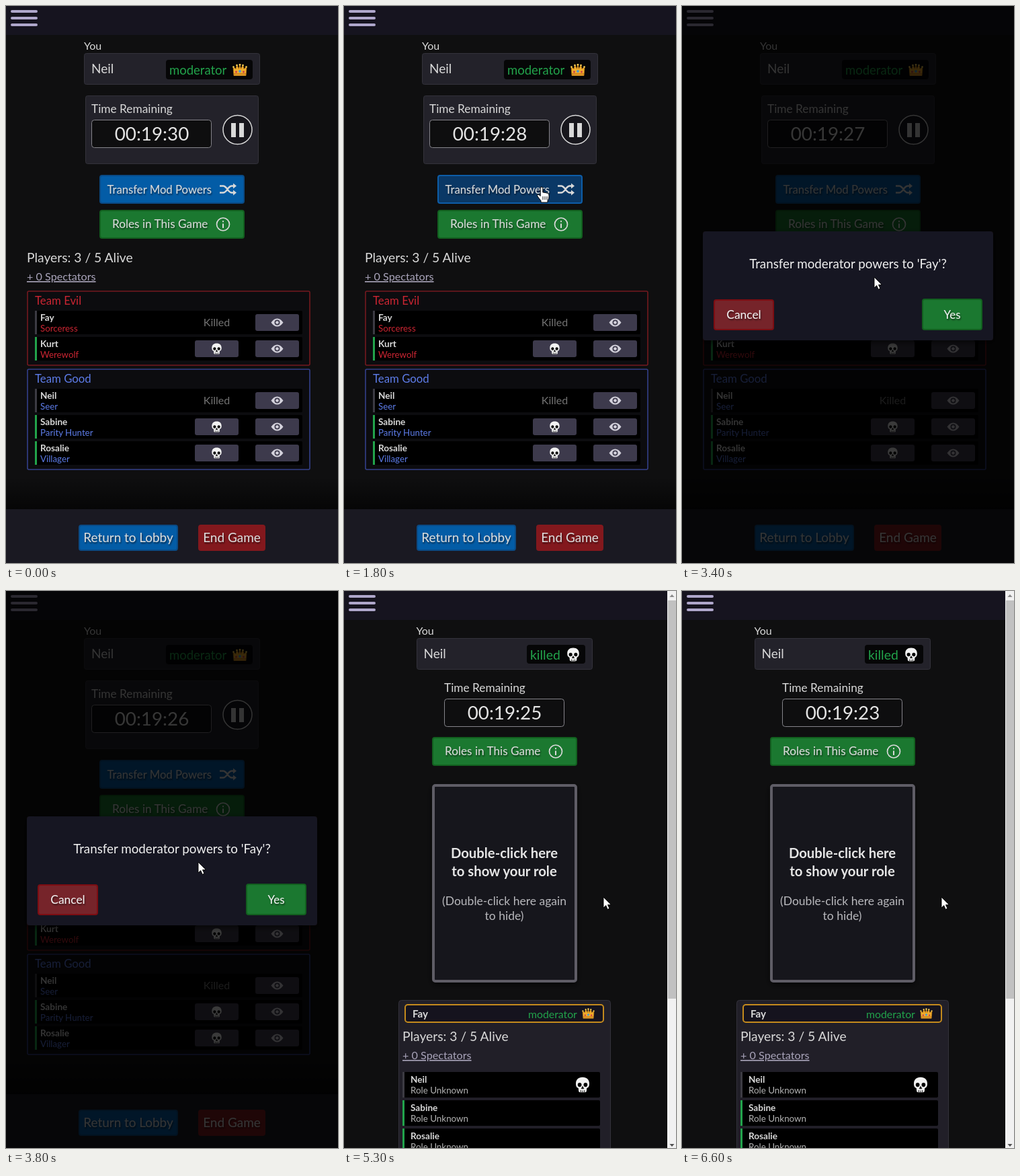
Recreate the animation shown at these times as an HTML page. Size 494x828 px, loop 7100 ms.

```html
<!DOCTYPE html>
<html lang="en">
<head>
<meta charset="utf-8">
<title>Transfer moderator powers</title>
<style>
html, body { margin: 0; width: 100%; height: 100%; overflow: hidden; background: #0f0f10; }
svg { display: block; width: 100vw; height: 100vh; }
text { font-family: Lato, "Open Sans", sans-serif; white-space: pre; }
</style>
</head>
<body>
<svg id="stage" viewBox="0 0 494 828">
  <defs>
    <linearGradient id="fade" x2="0" y2="1">
      <stop offset="0" stop-color="#000" stop-opacity="0"/>
      <stop offset="1" stop-color="#000" stop-opacity=".6"/>
    </linearGradient>
    <filter id="soft" x="-20%" y="-20%" width="140%" height="140%">
      <feDropShadow dx="0" dy="3" stdDeviation="4" flood-color="#000" flood-opacity=".6"/>
    </filter>
    <filter id="drop"><feDropShadow dx="1" dy="2" stdDeviation="1" flood-color="#000" flood-opacity=".6"/></filter>
  </defs>
</svg>
<script>
const LOOP = 7100;
const INK = '#d9d9d9', BRIGHT = '#f0f0f0', GREEN = '#22a34b', RED = '#cb2532', BLUE = '#5d7ce8';
const BTN = {
  blue: ['#035ca6', '#0a4a85'],
  blueHover: ['#0a3866', '#0d5da8'],
  green: ['#1b7830', '#12601f'],
  greenHover: ['#2d623e', '#188038'],
  red: ['#83181d', '#83181d'],
  cancel: ['#7a1a1e', '#7d0d12'],
  cancelSoft: ['#76242a', '#7d0d12'],
};

const rect = (x, y, w, h, fill, r = 0, stroke = 'none', sw = 1, extra = '') =>
  `<rect x="${x}" y="${y}" width="${w}" height="${h}" rx="${r}" fill="${fill}" stroke="${stroke}" stroke-width="${sw}" ${extra}/>`;
const text = (x, y, size, str, fill = INK, extra = '') =>
  `<text x="${x}" y="${y}" font-size="${size}" fill="${fill}" ${extra}>${str}</text>`;
const bold = (x, y, size, str, fill = INK, extra = '') =>
  text(x, y, size, str, fill, 'font-weight="700" ' + extra);
const group = (id, body) => `<g id="${id}">${body}</g>`;
const at = (x, y, s, body) => `<g transform="translate(${x} ${y}) scale(${s})">${body}</g>`;
const MID = 'text-anchor="middle" ';
const SHADE = 'filter="url(#drop)"';

// Icons are centred on the point they are given.
const skull = (x, y, s = 1) => at(x, y, s, `
  <path d="M-8-1.5C-8-6-5-9 0-9S8-6 8-1.5C8 1 7.5 3 5 4L4.6 8Q4 9 2.5 9H-2.5Q-4 9-4.6 8L-5 4C-7.5 3-8 1-8-1.5Z" fill="#f2f2f2"/>
  <path d="M0 2L-1.4 4.6H1.4ZM-2.2 6.4V9M0 6.8V9M2.2 6.4V9" fill="#111" stroke="#111" stroke-width=".8"/>
  <ellipse cx="-3.5" rx="2.3" ry="2.5"/><ellipse cx="3.5" rx="2.3" ry="2.5"/>`);
const crown = (x, y, s = 1) => at(x, y, s, `
  <path d="M-9 8L-10-5-6-2-4.500-8-1.500-2 0-9 1.500-2 4.500-8 6-2 10-5 9 8Z" fill="#f0ad2c" stroke="#c57f18" stroke-width=".7"/>
  <path d="M-9 5.500H9" stroke="#b8661a" stroke-width="1.2"/>
  <g fill="#ffd457"><circle cx="-9.5" cy="-5" r="1.3"/><circle cx="-4.5" cy="-7.5" r="1.3"/><circle cy="-8.2" r="1.4"/><circle cx="4.5" cy="-7.5" r="1.3"/><circle cx="9.5" cy="-5" r="1.3"/></g>
  <circle cy="1.5" r="1.9" fill="#4a9ad0"/><circle cx="-5.5" cy="2.5" r="1.4" fill="#c9364c"/><circle cx="5.5" cy="2.5" r="1.4" fill="#c9364c"/>`);
const eye = (x, y) => at(x, y, 1, `
  <path d="M-9 0Q-5-6 0-6T9 0Q5 6 0 6T-9 0Z" fill="#d4d2dc"/>
  <circle r="4" fill="#3d3a4c"/><circle r="2.3" fill="#d4d2dc"/>`);
const info = (x, y) => at(x, y, 1, `
  <circle r="9.5" fill="none" stroke="${INK}" stroke-width="1.7"/>
  <path d="M0-1V5.500M0-5.200V-3.200" stroke="${INK}" stroke-width="2"/>`);
const shuffle = (x, y) => at(x, y, 1, `
  <path d="M-12-5H-7C-1-5 0 5 6 5H9M-12 5H-7C-1 5 0-5 6-5H9" fill="none" stroke="${INK}" stroke-width="2.3"/>
  <path d="M8-9L13-5 8-1ZM8 1L13 5 8 9Z" fill="${INK}"/>`);

const button = (x, y, w, h, [fill, stroke], id = '') =>
  rect(x + 1, y + 1, w - 2, h - 2, fill, 3, stroke, 2, id && `id="${id}"`);
const box = (x, y, w, h) => rect(x + .5, y + .5, w - 1, h - 1, '#23222a', 3, '#33323b');
const clock = (x, y) => rect(x + .5, y + .5, 178, 41, '#0e0e0f', 4, '#85848a') +
  text(x + 90, y + 31, 27.8, '', '#e4e4e4', 'class="clock" ' + MID);
const menu = w => rect(0, 0, w, 43, '#16141f') +
  [8, 18, 28].map(y => rect(7, y - 2, 40, 4, '#afa7cb', 2)).join('');
const rolesButton = (x, y) => button(x, y, 216, 43, BTN.green) +
  text(x + 19, y + 27, 17.2, 'Roles in This Game', INK, SHADE) + info(x + 184, y + 21.5);
const players = (x, y) => text(x, y, 19.3, 'Players: 3 / 5 Alive') +
  text(x, y + 27, 16.2, '+ 0 Spectators', '#aaa5bb', 'text-decoration="underline"');

function playerRow(y, name, role, color, alive) {
  return rect(43, y, 398, 35, '#000', 2) +
    rect(43, y, 3, 35, alive ? GREEN : '#3c3b43') +
    bold(51, y + 14.5, 13.6, name) + text(51, y + 31, 13.3, role, color) +
    (alive ? rect(281, y + 5, 65, 25, '#3d3a4c', 3) + skull(313.5, y + 17.5, .9)
           : text(313.5, y + 23, 16, 'Killed', '#737373', MID)) +
    rect(371, y + 5, 65, 25, '#3d3a4c', 3) + eye(403.5, y + 17.5);
}
const team = (y, h, title, color, border, rows) =>
  rect(32, y, 420, h, '#0c0c0f', 2, border, 1.6) + text(43, y + 20, 16.8, title, color) +
  rows.map(([name, role, alive], i) => playerRow(y + 29 + 39 * i, name, role, color, alive)).join('');

const modView = rect(0, 0, 494, 828, '#0f0f10') + menu(494) +
  text(116, 65, 16, 'You') + box(116, 70, 262, 47) + text(127, 100, 19, 'Neil') +
  rect(238, 80, 129, 29, '#060607', 4) + text(243, 102, 18.5, 'moderator', GREEN) + crown(348, 95.5) +
  box(118, 133, 258, 102) + text(127, 159, 17.3, 'Time Remaining') + clock(127, 169) +
  `<circle cx="344.5" cy="184" r="21.5" fill="#17161c" stroke="${INK}" stroke-width="1.5"/>` +
  rect(335, 174, 7, 21, INK) + rect(347, 174, 7, 21, INK) +
  button(139, 251, 216, 43, BTN.blue, 'transfer') +
  text(150.5, 279, 16.7, 'Transfer Mod Powers', INK, SHADE) + shuffle(330, 272.5) +
  rolesButton(139, 303) + players(31, 381) +
  team(424, 110, 'Team Evil', RED, '#74191f', [['Fay', 'Sorceress', 0], ['Kurt', 'Werewolf', 1]]) +
  team(540, 149, 'Team Good', BLUE, '#34408a',
    [['Neil', 'Seer', 0], ['Sabine', 'Parity Hunter', 1], ['Rosalie', 'Villager', 1]]) +
  rect(0, 700, 494, 48, 'url(#fade)') + rect(0, 748, 494, 80, '#1a1922') +
  button(108, 771, 148, 39, BTN.blue) + text(182, 797, 18.9, 'Return to Lobby', INK, MID + SHADE) +
  button(286, 771, 100, 39, BTN.red) + text(336, 797, 19, 'End Game', INK, MID + SHADE);

const unknownRow = (y, name, alive) => rect(87, y, 294, 38, '#000', 2) +
  rect(87, y, 3, 38, alive ? GREEN : '#3c3b43') +
  bold(99, y + 15.5, 13.6, name) + text(99, y + 32, 13.4, 'Role Unknown', '#b4b4b4') +
  (alive ? '' : skull(355, y + 19, 1.25));

const playerView = rect(0, 0, 494, 828, '#0f0f10') + menu(481) +
  text(107.5, 65, 16, 'You') + box(108, 70, 262, 47) + text(118.5, 100, 19, 'Neil') +
  rect(272, 80, 87, 28, '#060607', 4) + text(277, 102, 19.4, 'killed', GREEN) + skull(341, 94.5, 1.1) +
  text(149, 150, 17.3, 'Time Remaining') + clock(149, 160) + rolesButton(131, 217) +
  rect(133, 289, 212, 291, '#15131e', 3, '#5f5d66', 4, 'filter="url(#soft)"') +
  bold(238.5, 397, 20.3, 'Double-click here', '#e6e6e6', MID) +
  bold(238.5, 424, 20.3, 'to show your role', '#e6e6e6', MID) +
  text(238.5, 467, 17.5, '(Double-click here again', '#b9b9bd', MID) +
  text(238.5, 489, 17.5, 'to hide)', '#b9b9bd', MID) +
  rect(81.5, 608.5, 315, 230, '#211f28', 4, '#33323b') +
  rect(91, 615, 295, 26, '#15131e', 4, '#c48a1c', 2) + bold(102, 634, 15.2, 'Fay') +
  text(274, 634.5, 15.8, 'moderator', GREEN) + crown(363.5, 628.5, .85) + players(87, 669) +
  unknownRow(715, 'Neil', 0) + unknownRow(757, 'Sabine', 1) + unknownRow(799, 'Rosalie', 1) +
  rect(481, 0, 13, 828, '#f1f1f1') + rect(482, 14, 12, 592, '#c1c1c1') +
  '<path d="M484.5 9L488 5 491.5 9Z" fill="#8a8a8a"/><path d="M484.5 822L488 826 491.5 822Z" fill="#505050"/>';

const panel = (y, h) => rect(31, y, 432, h, '#171520', 4, 'none', 1, 'filter="url(#soft)"');
const pickModal = panel(315, 202) +
  bold(143, 350, 16.8, 'Select a new moderator', BRIGHT) + crown(338, 344, .88) +
  rect(61, 379, 372, 34, '#24232c', 2, '#484650', 2, 'id="choice"') + bold(67, 403, 16.5, 'Fay', BRIGHT) +
  text(362, 403, 16.8, 'killed', GREEN) + skull(416, 397, .98) +
  button(193, 456, 108, 45, BTN.cancel) + text(247, 485, 17.4, 'Cancel', BRIGHT, MID + SHADE);
const askModal = panel(335, 162) +
  text(247, 390, 18.8, "Transfer moderator powers to 'Fay'?", BRIGHT, MID) +
  button(47, 436, 90, 46, BTN.cancelSoft) + text(92, 465, 17.4, 'Cancel', BRIGHT, MID + SHADE) +
  button(357, 435, 90, 47, BTN.green, 'yes') + text(402, 465, 17, 'Yes', BRIGHT, MID + SHADE);

const arrow = '<path d="M0 0V16L3.7 12.5 6.2 18.3 9 17.1 6.5 11.5H11.5Z" fill="#fff" stroke="#000" stroke-width=".9"/>';
const hand = `<path d="M-1.8 1.5Q-1.8 0 0 0T1.8 1.5V8L4 8.2 9 9.3Q11 9.8 11 12V15Q11 18 9 20V23H-1V20.5L-6 14Q-7 12-5.4 11.5T-1.8 13.5Z" fill="#fff" stroke="#000"/>
  <path d="M2 14V19M5 14V19M8 14V19" stroke="#000" stroke-width=".9"/>`;

const stage = document.getElementById('stage');
stage.insertAdjacentHTML('beforeend',
  group('mod', modView) + group('player', playerView) +
  rect(0, 0, 494, 828, '#000', 0, 'none', 1, 'id="dim"') +
  group('pick', pickModal) + group('ask', askModal) +
  group('cursor', group('arrow', arrow) + group('hand', hand)));

const $ = id => document.getElementById(id);
const clocks = document.querySelectorAll('.clock');
const show = (id, on) => { $(id).style.display = on ? '' : 'none'; };
const paint = (id, [fill, stroke]) => {
  $(id).setAttribute('fill', fill);
  $(id).setAttribute('stroke', stroke);
};

// Pointer stops: time, x, y
const PATH = [
  [300, 500, 340], [1300, 294, 269], [2200, 294, 269], [2600, 286, 340],
  [3000, 286, 403], [4100, 286, 403], [4700, 391, 454], [5100, 391, 454], [5300, 386, 455],
];
const ease = p => p * p * (3 - 2 * p);
function pointer(t) {
  const i = PATH.findIndex(p => p[0] > t);
  if (i < 1) return PATH.at(i).slice(1);
  const [t0, x0, y0] = PATH[i - 1], [t1, x1, y1] = PATH[i];
  const k = ease((t - t0) / (t1 - t0));
  return [x0 + (x1 - x0) * k, y0 + (y1 - y0) * k];
}

function draw(ms) {
  const t = Math.floor(ms / 100) * 100;
  const picking = t >= 2000 && t < 3400;
  const asking = t >= 3400 && t < 5200;
  const done = t >= 5200;
  const [x, y] = pointer(t);
  const inside = (l, top, r, b) => x >= l && x <= r && y >= top && y <= b;

  show('mod', !done);
  show('player', done);
  show('pick', picking);
  show('ask', asking);
  show('dim', picking || asking);
  $('dim').setAttribute('opacity', picking ? .72 : .76);

  const seconds = 30 - Math.floor((t + 400) / 1000);
  clocks.forEach(c => { c.textContent = '00:19:' + seconds; });

  const onTransfer = t < 2000 && inside(139, 251, 355, 294);
  const onChoice = picking && inside(60, 378, 434, 414);
  const onYes = asking && inside(357, 435, 447, 482);
  paint('transfer', onTransfer ? BTN.blueHover : BTN.blue);
  paint('choice', onChoice ? ['#383644', '#5c5a66'] : ['#24232c', '#484650']);
  paint('yes', onYes ? BTN.greenHover : BTN.green);

  const pointing = onTransfer || onChoice || onYes;
  show('hand', pointing);
  show('arrow', !pointing);
  $('cursor').setAttribute('transform', `translate(${x} ${y})`);
}

const start = performance.now();
function tick() {
  draw((performance.now() - start) % LOOP);
  requestAnimationFrame(tick);
}
tick();
</script>
</body>
</html>
```
